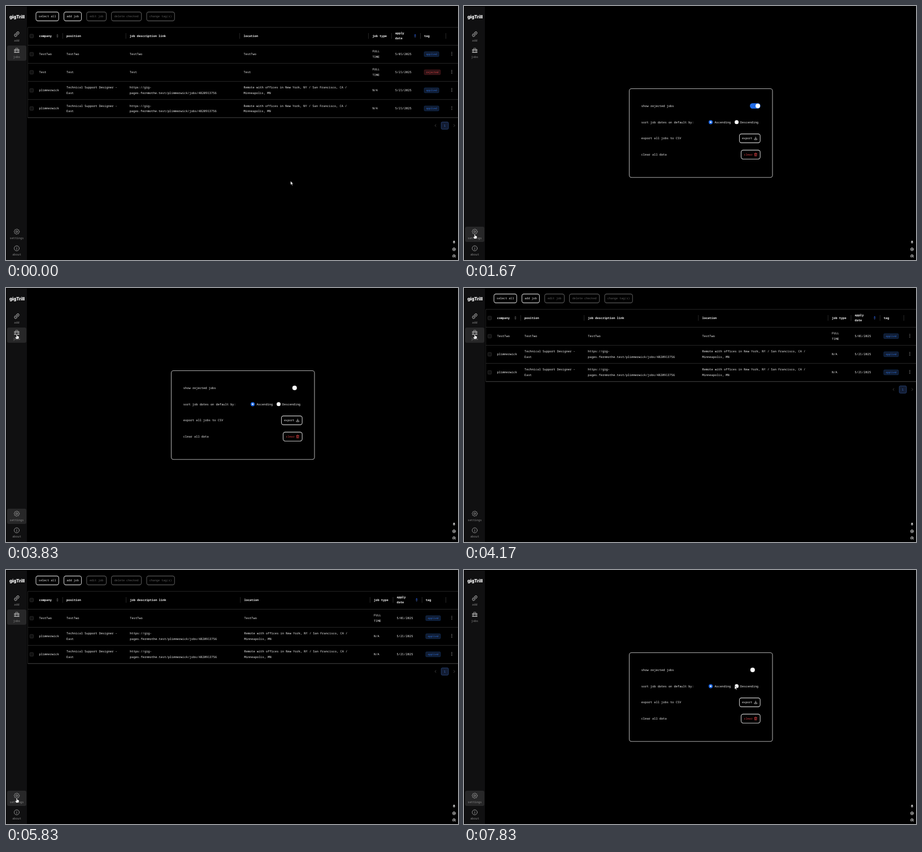
An HTML page that plays this animation: 800x450 px, repeating every 8000 ms.

```html
<!DOCTYPE html>
<html lang="en">
<head>
<meta charset="utf-8">
<title>Job tracker</title>
<style>
html, body { margin: 0; width: 100%; height: 100%; overflow: hidden; background: #000; }
svg { display: block; width: 100vw; height: 100vh; }
text { font: 500 5.35px "Noto Sans Mono", monospace; fill: #f2f2f2; text-rendering: geometricPrecision; white-space: pre; }
.head { font-weight: 600; fill: #f0f0f0; }
.btn { font-size: 5.12px; }
.nav { font-size: 5.2px; fill: #8c8c8c; text-anchor: middle; }
.tag { font-size: 4.6px; }
.logo { font: 800 8.2px Inter, sans-serif; fill: #fff; text-anchor: middle; letter-spacing: -.1px; }
.mid { text-anchor: middle; }
.icon { fill: none; stroke: #999; stroke-width: .9; stroke-linecap: round; stroke-linejoin: round; }
</style>
</head>
<body>
<svg id="stage" viewBox="0 0 800 450"></svg>
<script>
const LOOP = 8000;
const BLUE = '#1f6ae6';
const stage = document.getElementById('stage');

const text = (x, y, s, cls = '', fill = '') =>
  `<text x="${x}" y="${y + 1.75}" class="${cls}"${fill && ` style="fill:${fill}"`}>${s}</text>`;
const lines = (x, y, s, cls) => {
  const parts = s.split('|');
  return parts.map((p, i) => text(x, y + (i - (parts.length - 1) / 2) * 9.15, p, cls)).join('');
};
const rect = (x, y, w, h, rx, fill, stroke = 'none', sw = 1) =>
  `<rect x="${x}" y="${y}" width="${w}" height="${h}" rx="${rx}" fill="${fill}" stroke="${stroke}" stroke-width="${sw}"/>`;
const dot = (x, y, r, fill) => `<circle cx="${x}" cy="${y}" r="${r}" fill="${fill}"/>`;
const line = (x1, y1, x2, y2, c, w = .8) => `<path d="M${x1} ${y1}L${x2} ${y2}" stroke="${c}" stroke-width="${w}"/>`;
const icon = (x, y, body, color = '#999') =>
  `<g class="icon" transform="translate(${x} ${y})" style="stroke:${color}">${body}</g>`;
const group = (id, body) => `<g id="${id}">${body}</g>`;

// Sidebar
const NAV = { add: 41, jobs: 70, settings: 391, about: 420.5 };
const gear = Array.from({ length: 33 }, (_, i) => {
  const a = i / 32 * 2 * Math.PI, r = i % 4 < 2 ? 4.7 : 3.8;
  return (r * Math.cos(a)).toFixed(2) + ' ' + (r * Math.sin(a)).toFixed(2);
}).join('L');
const GLYPHS = {
  add: '<g transform="rotate(-45)"><path d="M-.8-2H-3A2 2 0 0 0-3 2H-.8M.8-2H3A2 2 0 0 1 3 2H.8M-2.2 0H2.2" stroke-width="1.1"/></g>',
  jobs: '<path d="M-4.6-2H4.6V.8H1.2V0H-1.2V.8H-4.6ZM-4.6 1.8H-1.2V2.4H1.2V1.8H4.6V4.2H-4.6Z" fill="#999" stroke="none"/><path d="M-1.9-2V-3.9H1.9V-2"/>',
  settings: `<path d="M${gear}Z"/><circle r="1.6"/>`,
  about: '<circle r="4.5"/><path d="M0-.4V2.2M0-2.2V-2"/>'
};

function sidebar() {
  let s = rect(1, 1, 36, 449, 0, '#101011') + text(19.5, 20, 'gigTrill', 'logo');
  for (const [name, y] of Object.entries(NAV)) {
    s += group('bg-' + name, rect(2, y, 34, 27, 3, '#272728'));
    s += icon(19, y + 8.8, GLYPHS[name]) + text(19, y + 19.8, name, 'nav');
  }
  return s;
}

// Jobs page
const JOB = ['plimmerwick', 'Technical Support Designer -|East',
  'https:\/\/gig-|pages.fernmothe.test/plimmerwick/jobs/4820913756',
  'Remote with offices in New York, NY / San Francisco, CA /|Minneapolis, MN', 'N/A', '5/21/2025', 'applied'];
const test = (name, date, tag) => [name, name, name, name, 'FULL|TIME', date, tag];
const ROWS = [test('TestTwo', '5/01/2025', 'applied'), test('Test', '5/21/2025', 'rejected'), JOB, JOB];
const HEADS = ['company', 'position', 'job description link', 'location', 'job type', 'apply|date', 'tag'];
const TAGS = { applied: ['#111a2c', '#15417e', '#2a6fdc'], rejected: ['#2a1215', '#681c20', '#dc4446'] };

const button = (x, w, label, on) =>
  rect(x, 10.6, w, 15.8, 3.6, '#000', on ? '#c4c4c4' : '#555', 1.1) +
  text(x + w / 2, 18.5, label, 'btn mid', on ? '#eee' : '#606060');
const toolbar = () => button(53, 40.3, 'select all', 1) + button(102.5, 31, 'add job', 1) +
  button(142.8, 34.7, 'edit job') + button(186.6, 53, 'delete checked') + button(249, 49.3, 'change tag(s)');
const checkbox = y => rect(42.2, y - 3.2, 6.4, 6.4, 1.2, '#111', '#3c3c3c', .6);
const sorter = (x, y, up, down) =>
  `<path d="M${x - 1.8} ${y - .7}l1.8-2 1.8 2Z" fill="${up}"/><path d="M${x - 1.8} ${y + .8}l1.8 2 1.8-2Z" fill="${down}"/>`;

function table(rows, cols, seps) {
  const bottom = 69.6 + rows.length * 32.05;
  let s = toolbar();
  s += line(38.5, 37.9, 800, 37.9, '#303030') + line(38.5, 37.9, 38.5, bottom, '#282828');
  s += HEADS.map((h, i) => lines(cols[i], 53, h, 'head')).join('');
  s += seps.map(x => line(x, 48, x, 58, '#303030')).join('');
  s += checkbox(53.2) + sorter(91, 53, '#666', '#666') + sorter(cols[5] + 35.3, 53, '#2f6bff', '#3a55a0');
  rows.forEach((row, i) => {
    const y = 85.2 + i * 32.05;
    s += line(38.5, y - 15.7, 800, y - 15.7, '#303030') + checkbox(y + .2);
    s += row.slice(0, 6).map((v, j) => lines(cols[j], y, v)).join('');
    const [bg, edge, ink] = TAGS[row[6]];
    s += rect(cols[6] + .2, y - 4.2, row[6].length * 2.76 + 6.6, 8.6, 1.4, bg, edge, .6);
    s += text(cols[6] + 3.4, y, row[6], 'tag', ink);
    s += [-2.5, 0, 2.5].map(d => dot(789, y - .6 + d, .6, '#ccc')).join('');
  });
  s += line(38.5, bottom, 800, bottom, '#444', 1);
  const py = bottom + 14;
  s += rect(770.3, py - 6.3, 12.8, 12.8, 2, '#131d33', '#29467c', .8) + text(776.7, py, '1', 'mid', '#3c6cc0');
  s += icon(760, py, '<path d="M1-1.8L-1 0 1 1.8"/>', '#444') + icon(793.5, py, '<path d="M-1-1.8L1 0-1 1.8"/>', '#444');
  return s;
}

// Settings page
function settings() {
  return rect(292.5, 146.5, 253.5, 157.3, 4, '#000', '#a8a8a8', 1.1) +
    text(313.8, 177, 'show rejected jobs') +
    text(313.8, 205.8, 'sort job dates on default by:') +
    text(313.8, 234.5, 'export all jobs to CSV') +
    text(313.8, 263.3, 'clear all data') +
    group('track', rect(506, 172.2, 18.6, 9.6, 4.8, BLUE)) +
    '<circle id="knob" cy="177" r="4" fill="#fff"/>' +
    dot(436.6, 205.8, 3.6, BLUE) + dot(436.6, 205.8, 1.4, '#fff') + text(443.4, 205.8, 'Ascending') +
    dot(482.5, 205.8, 3.5, '#fff') + text(489, 205.8, 'Descending') +
    rect(487.5, 226.6, 36.7, 15.8, 3.6, '#000', '#c4c4c4', 1.1) + text(492, 234.5, 'export', 'btn') +
    icon(516.2, 234.5, '<path d="M0-2.4V1M-1.3-.2L0 1 1.3-.2M-2.3 1V2.4H2.3V1" stroke-width=".7"/>', '#ddd') +
    rect(490.5, 255.4, 33.7, 15.8, 3.6, '#000', '#c4c4c4', 1.1) + text(495.4, 263.3, 'clear', 'btn', '#dc4446') +
    icon(516.2, 263.3, '<path d="M-2.4-1.6H2.4M-1-1.6V-2.6H1V-1.6M-1.8-1.6V2.5H1.8V-1.6M-.6 0V1.2M.6 0V1.2" stroke-width=".7"/>', '#dc4446');
}

const corner = () =>
  icon(793, 418.3, '<rect x="-1.1" y="-2.6" width="2.2" height="3.4" rx="1.1" fill="#ddd" stroke="none"/><path d="M-1.8 0A1.8 1.6 0 0 0 1.8 0M0 1.7V2.7" stroke-width=".6"/>', '#ddd') +
  icon(793, 431, '<circle r="2.6"/><path d="M-.8-.8L.8.8M.8-.8L-.8.8"/>', '#ddd') +
  icon(793, 443, '<path d="M-1 2.5A2.6 2.6 0 1 1 2.6 0"/><circle r=".8"/><path d="M1 1.8H2.6"/>', '#ddd');

const ARROW = '<path d="M0 0V7L1.6 5.5 2.7 8 4 7.4 2.9 5H5Z" fill="#fff" stroke="#000" stroke-width=".6"/>';
const HAND = '<path d="M-.9.6Q0-.6.9.6V3.2L3.4 3.9Q4.4 4.3 4.2 5.6L3.5 9H-1.2L-3 5.8Q-3.2 4.6-2 5L-.9 6Z" fill="#fff" stroke="#000" stroke-width=".6"/>';

stage.innerHTML = sidebar() +
  group('all', table(ROWS, [58.5, 107, 218.8, 420.5, 648.4, 688.8, 740], [100.3, 212.2, 413.6, 641.6, 682.4, 733.5, 778.5])) +
  group('open', table(ROWS.filter(r => r[6] !== 'rejected'), [58.5, 107, 219.3, 421.5, 651, 691.5, 742.8], [100.3, 212.6, 414.8, 644.3, 685, 736.3, 778.5])) +
  group('prefs', settings()) + corner() +
  group('cursor', group('arrow', ARROW) + group('hand', HAND));

const el = id => document.getElementById(id);
const show = (id, on) => el(id).setAttribute('display', on ? 'inline' : 'none');
const clamp = v => Math.min(1, Math.max(0, v));
const smooth = u => u * u * (3 - 2 * u);

// start, end, x, y, bend x, bend y
const MOVES = [
  [330, 1140, 19, 403.5, 0, -54],
  [1670, 2540, 510, 181.3, 0, 0],
  [3040, 3810, 19, 81.5, 0, 56],
  [4750, 5520, 19, 400, 40, 0],
  [5520, 5800, 19, 403.5, 0, 0],
  [6670, 7420, 478, 209, 0, 0],
  [7420, 7580, 469, 204.5, 0, 0],
  [7700, 7830, 479, 204.5, 0, 0]
];

function cursorAt(t) {
  let x = 503.5, y = 310;
  for (const [a, b, tx, ty, bx, by] of MOVES) {
    if (t < a) break;
    const s = smooth(clamp((t - a) / (b - a))), arc = 4 * s * (1 - s);
    x += (tx - x) * s + bx * arc;
    y += (ty - y) * s + by * arc;
  }
  return [x, y];
}

function pageAt(t) {
  if (t < 1420) return 'all';
  return t >= 4080 && t < 6250 ? 'open' : 'prefs';
}

function draw(t) {
  const page = pageAt(t), [x, y] = cursorAt(t);
  for (const id of ['all', 'open', 'prefs']) show(id, id === page);

  const active = page === 'prefs' ? 'settings' : 'jobs';
  let hand = page === 'prefs' && x > 506 && x < 525 && y > 172 && y < 182;
  for (const [name, top] of Object.entries(NAV)) {
    const over = x > 2 && x < 36 && y > top && y < top + 27;
    hand = hand || over;
    show('bg-' + name, over || name === active);
  }

  const off = smooth(clamp((t - 2830) / 170));
  el('track').setAttribute('opacity', 1 - off);
  el('knob').setAttribute('cx', 520 - 9.2 * off);

  show('hand', hand);
  show('arrow', !hand);
  el('cursor').setAttribute('transform', `translate(${x.toFixed(2)} ${y.toFixed(2)})`);
}

const start = performance.now();
function tick() {
  draw((performance.now() - start) % LOOP);
  requestAnimationFrame(tick);
}
tick();
</script>
</body>
</html>
```
